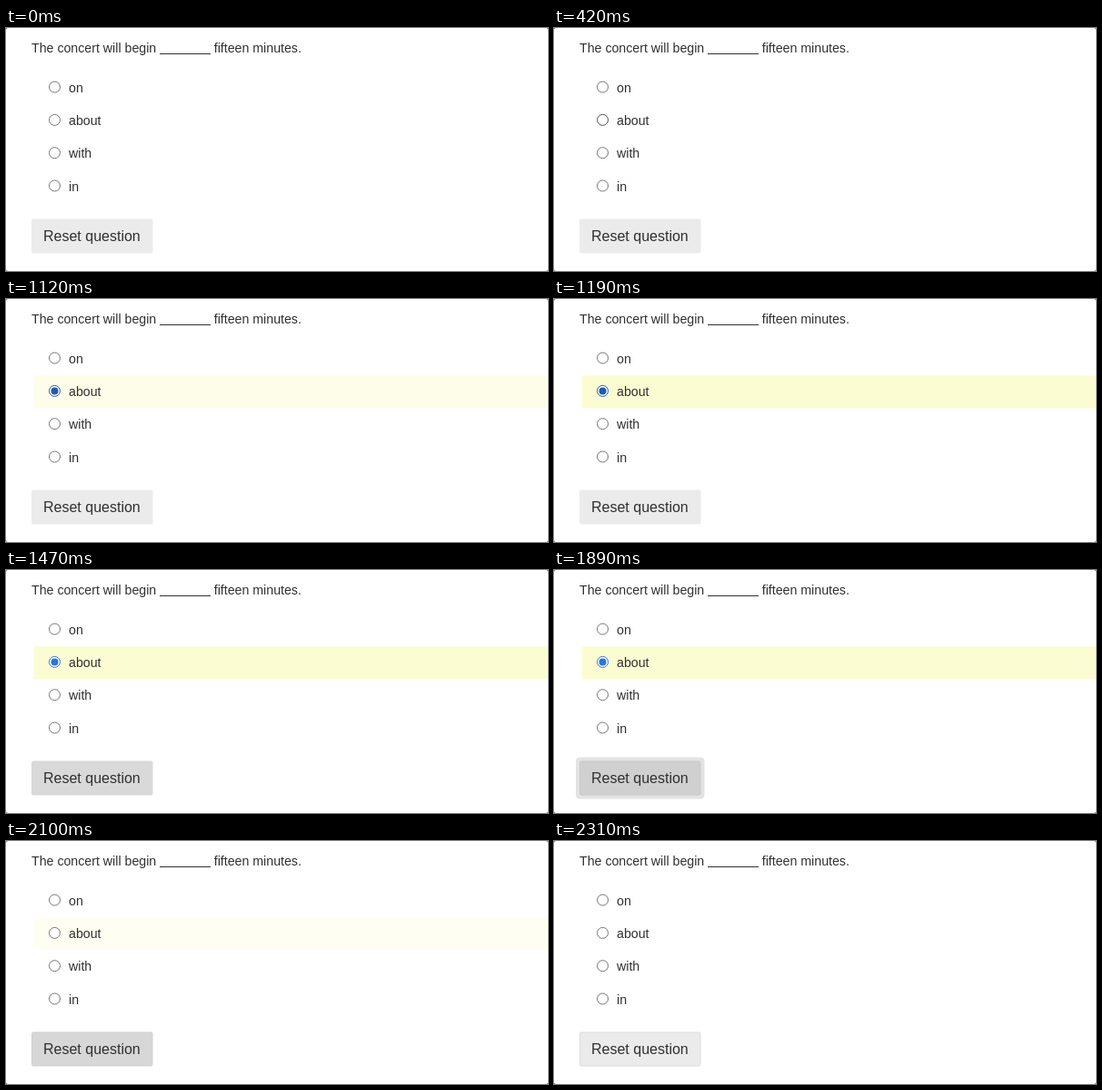
Write an HTML page that moves like this. It is 596x268 px and loops after 2.8 s.

```html
<!DOCTYPE html>
<html lang="en">
<head>
<meta charset="utf-8">
<title>Quiz question</title>
<style>
  html, body { margin: 0; width: 100%; height: 100%; overflow: hidden; background: #777; }
  svg { display: block; width: 596px; height: 268px; font: 14.2px "Liberation Sans", Arial, sans-serif; }
  text { fill: #303030; }
</style>
</head>
<body>
<svg id="stage" viewBox="0 0 596 268">
  <rect width="596" height="268" rx="2.5" fill="#fff"/>
  <rect id="band" x="30.7" y="84.3" width="566" height="36.2" fill="#fcfcd3"/>
  <text x="28" y="27">The concert will begin</text>
  <rect x="169" y="28" width="56" height="1" fill="#303030"/>
  <text x="228.7" y="27">fifteen minutes.</text>
  <g id="options"></g>
  <rect id="ring" x="24" y="206.5" width="141.5" height="46" rx="4.5" fill="#e3e3e3"/>
  <rect id="button" x="28.5" y="211" width="132.5" height="37" rx="1.5"/>
  <text x="41" y="235" font-size="16">Reset question</text>
</svg>
<script>
const LOOP = 2800;
const $ = id => document.getElementById(id);
const REST = '#767676', HOVER = '#4f4f4f', PRESS = '#858585';
const BLUE = '#2f74d6', DARK_BLUE = '#2259ad';

// Each track lists [start ms, value]; a value holds until the next start.
const tracks = {
  about: [[0, REST], [420, HOVER], [910, PRESS], [1050, DARK_BLUE], [1260, BLUE], [2030, REST]],
  with: [[0, REST], [1260, HOVER], [1330, REST]],
  band: [[0, 0], [1120, .5], [1190, 1], [2030, .84], [2100, .3], [2170, 0]],
  ring: [[0, 0], [1890, 1], [2030, 0]],
  fill: [[0, '#ebebeb'], [1470, '#d9d9d9'], [1890, '#d0d0d0'], [2030, '#d4d4d4'],
         [2100, '#d7d7d7'], [2170, '#d9d9d9'], [2310, '#ebebeb']],
  edge: [[0, '#ebebeb'], [1470, '#d9d9d9'], [1890, '#c8c8c8'], [2030, '#d0d0d0'],
         [2170, '#d3d3d3'], [2310, '#dcdcdc']]
};
const at = (name, t) => tracks[name].findLast(([start]) => t >= start)[1];

$('options').innerHTML = ['on', 'about', 'with', 'in'].map((word, i) => {
  const y = 65.1 + i * 36.3;
  return `<circle id="${word}" cx="53.5" cy="${y}" r="6" fill="#fff" stroke="${REST}"/>
    <circle id="${word}-dot" cx="53.5" cy="${y}" r="4" opacity="0"/>
    <text x="69" y="${y + 5.7}">${word}</text>`;
}).join('');

function draw(now) {
  const t = now % LOOP;
  const about = at('about', t);
  const checked = about === BLUE || about === DARK_BLUE;
  $('about').setAttribute('stroke', about);
  $('about-dot').setAttribute('fill', about);
  $('about-dot').setAttribute('opacity', checked ? 1 : 0);
  $('with').setAttribute('stroke', at('with', t));
  $('band').setAttribute('opacity', at('band', t));
  $('ring').setAttribute('opacity', at('ring', t));
  $('button').setAttribute('fill', at('fill', t));
  $('button').setAttribute('stroke', at('edge', t));
}

const start = performance.now();
function loop() {
  draw(performance.now() - start);
  requestAnimationFrame(loop);
}
loop();
</script>
</body>
</html>
```
